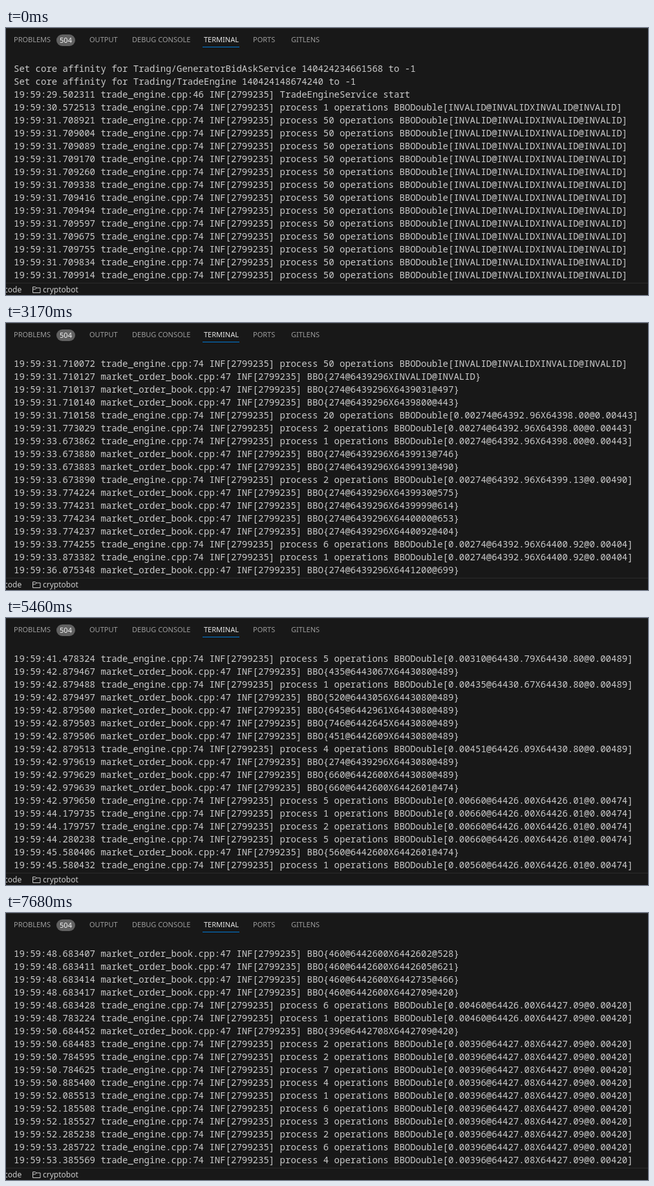
An HTML page that plays this animation: 993x414 px, repeating every 8000 ms.

```html
<!DOCTYPE html>
<html lang="en">
<meta charset="utf-8">
<title>Terminal log</title>
<style>
html, body { margin: 0; width: 993px; height: 414px; overflow: hidden; background: #181818; }
body { position: relative; color: #ccc; font: 12px/18px "Noto Sans", sans-serif; white-space: pre; }
body > * { position: absolute; }
.tab { top: 9px; font-size: 11px; color: #9d9d9d; }
.active { color: #e7e7e7; }
.badge { left: 78px; top: 10px; width: 29px; height: 18px; border-radius: 9px; background: #616161; color: #f8f8f8; font-size: 11px; line-height: 17px; text-align: center; }
.line { left: 0; width: 993px; height: 1px; background: #2b2b2b; }
.mark { left: 304px; top: 29px; width: 57px; height: 1px; background: #0078d4; }
.status { top: 397px; }
#log { left: 12px; top: 53px; margin: 0; font: 14px/20px "Noto Sans Mono", monospace; }
svg { left: 0; top: 0; }
</style>
<body><div class="line" style="top:0"></div><span class="tab" style="left:12px">PROBLEMS</span><span class="badge">504</span><span class="tab" style="left:129px">OUTPUT</span><span class="tab" style="left:195px">DEBUG CONSOLE</span><span class="tab active" style="left:306px">TERMINAL</span><span class="tab" style="left:382px">PORTS</span><span class="tab" style="left:441px">GITLENS</span><div class="mark"></div><pre id="log"></pre><div class="line" style="top:395px"></div><span class="status" style="left:-3px">code</span><span class="status" style="left:57px">cryptobot</span><svg width="993" height="414" fill="none"><path d="M41.5 410.5v-9h4l1.5 1.5h6v7.5zM41.5 405h4l1.5-2" stroke="#ccc"/><g id="pointer"><path id="beam" d="M-3-7.5h2q1 0 1 1 0-1 1-1h2M0-6.5v13M-3 7.5h2q1 0 1-1 0 1 1 1h2" stroke="#181818" stroke-width="3"/><use href="#beam"/><path d="M-3-7.5h2q1 0 1 1 0-1 1-1h2M0-6.5v13M-3 7.5h2q1 0 1-1 0 1 1 1h2" stroke="#fff"/></g></svg>
<script>
// Each entry: seconds, then an operation count or a new best bid/offer.
const entries = `30.572513 1
31.708921 50
31.709004 50
31.709089 50
31.709170 50
31.709260 50
31.709338 50
31.709416 50
31.709494 50
31.709597 50
31.709675 50
31.709755 50
31.709834 50
31.709914 50
31.709992 50
31.710072 50
31.710127 274@6439296XINVALID@INVALID
31.710137 274@6439296X6439031@497
31.710140 274@6439296X6439800@443
31.710158 20
31.773029 2
33.673862 1
33.673880 274@6439296X6439913@746
33.673883 274@6439296X6439913@490
33.673890 2
33.774224 274@6439296X6439930@575
33.774231 274@6439296X6439999@614
33.774234 274@6439296X6440000@653
33.774237 274@6439296X6440092@404
33.774255 6
33.873382 1
36.075348 274@6439296X6441200@699
36.075355 274@6439296X6443792@567
36.075359 274@6439296X6442330@451
36.075376 3
37.376263 310@6443079X6442330@451
37.376304 5
37.376314 310@6443079X6443792@567
37.376317 310@6443079X6443080@489
37.376324 2
39.277726 4
39.277744 2
39.377876 1
39.377896 1
41.378599 6
41.478324 5
42.879467 435@6443067X6443080@489
42.879488 1
42.879497 520@6443056X6443080@489
42.879500 645@6442961X6443080@489
42.879503 746@6442645X6443080@489
42.879506 451@6442609X6443080@489
42.879513 4
42.979619 274@6439296X6443080@489
42.979629 660@6442600X6443080@489
42.979639 660@6442600X6442601@474
42.979650 5
44.179735 1
44.179757 2
44.280238 5
45.580406 560@6442600X6442601@474
45.580432 1
45.981783 1
46.081747 460@6442600X6442601@474
46.081793 7
47.382723 2
47.482483 3
47.482506 4
48.683388 1
48.683407 460@6442600X6442602@528
48.683411 460@6442600X6442605@621
48.683414 460@6442600X6442735@466
48.683417 460@6442600X6442709@420
48.683428 6
48.783224 1
50.684452 396@6442708X6442709@420
50.684483 2
50.784595 2
50.784625 7
50.885400 4
52.085513 1
52.185508 6
52.185527 3
52.285238 2
53.285722 6
53.385569 4`.split("\n");

const lines = [
  "Set core affinity for Trading/GeneratorBidAskService 140424234661568 to -1",
  "Set core affinity for Trading/TradeEngine 140424148674240 to -1",
  "19:59:29.502311 trade_engine.cpp:46 INF[2799235] TradeEngineService start"
];
const decimal = n => n.length > 3 ? (n / 100).toFixed(2) : (n / 1e5).toFixed(5);
let quote = "INVALID@INVALIDXINVALID@INVALID";
for (const entry of entries) {
  const [time, value] = entry.split(" ");
  const isQuote = value.includes("@");
  if (isQuote) quote = value.replace(/\d+/g, decimal);
  lines.push(`19:59:${time} ` + (isQuote
    ? `market_order_book.cpp:47 INF[2799235] BBO{${value}}`
    : `trade_engine.cpp:74 INF[2799235] process ${value} operations BBODouble[${quote}]`));
}

const LOOP = 8000, ROWS = 17, STEP = 6;
const scrolls = [1810, 2290, 3170, 3490, 4080, 4390, 4980, 5460, 5970, 6360, 6960, 7680];
// Pointer stops: time, x, y; a stop without a place hides it.
const stops = [
  [0], [500, 962, 381], [580, 840, 180], [660, 720, 47], [740, 640, 80], [820, 592, 125], [900, 579, 138],
  [1970, 583, 139], [2050, 587, 140], [2690, 640, 137], [2770, 770, 132], [2850, 953, 128], [2930]
];
const log = document.getElementById("log"), pointer = document.getElementById("pointer");
let shown = -1;

function draw() {
  const t = performance.now() % LOOP;
  const first = STEP * scrolls.filter(s => s <= t).length;
  if (first !== shown) {
    log.textContent = lines.slice(first, first + ROWS).join("\n");
    shown = first;
  }
  const [, x, y] = stops.findLast(s => s[0] <= t);
  pointer.setAttribute("visibility", x ? "visible" : "hidden");
  if (x) pointer.setAttribute("transform", `translate(${x} ${y})`);
  requestAnimationFrame(draw);
}
draw();
</script>
</body>
</html>
```
